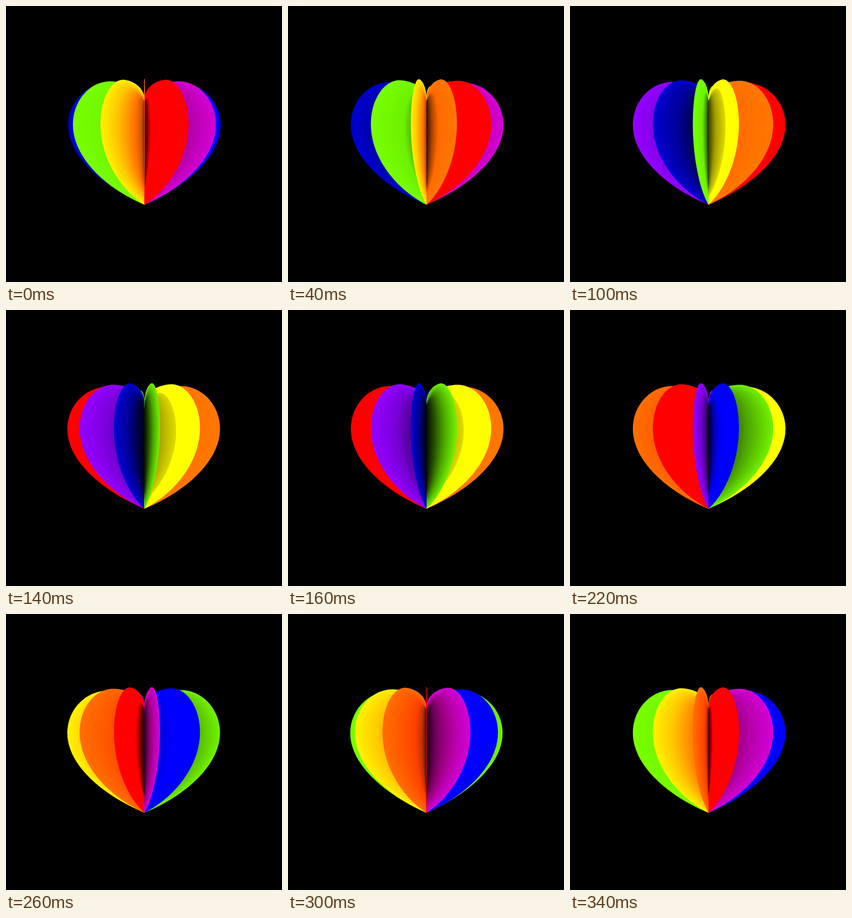
An HTML page with a canvas for the animation above (0.36 s loop, 500x500 px).

```html
<!DOCTYPE html>
<html lang="en">
<head>
<meta charset="utf-8">
<title>Turning paper heart</title>
<style>
  html, body { margin: 0; width: 100%; height: 100%; overflow: hidden; background: #000; }
  canvas { display: block; }
</style>
</head>
<body>
<canvas id="stage" width="500" height="500"></canvas>
<script>
const ctx = document.getElementById('stage').getContext('2d');
const AXIS = 250.75, EYE_Y = 230, RADIUS = 138, DEPTH = 0.155;
const STEP_MS = 20, STEPS = 18, TURN = 10, BANDS = 40;

// Half-heart outline as cubic curves: radius from the axis, height.
const curves = [
  [0, 170, 0, 152, 28, 140, 65, 140],
  [65, 140, 105, 140, RADIUS, 174, RADIUS, 216],
  [RADIUS, 216, RADIUS, 274, 73, 328, 0, 360]
];
const outline = curves.flatMap(c => Array.from({ length: 25 }, (_, i) => {
  const t = i / 24, u = 1 - t;
  const at = k => u * u * u * c[k] + 3 * u * u * t * c[k + 2] + 3 * u * t * t * c[k + 4] + t * t * t * c[k + 6];
  return [at(0), at(1)];
}));

// Shading of both faces, from the axis (0) to the rim (1).
const petals = [
  { left: [[0, '#300800'], [.12, '#c03000'], [.3, '#ff4000'], [.6, '#ff5500'], [1, '#ff6e00']],
    right: [[0, '#200c00'], [.2, '#a04000'], [.45, '#ff6a00'], [1, '#ff7800']] },
  { left: [[0, '#200000'], [.12, '#580000'], [.34, '#ff0000'], [1, '#ff0000']],
    right: [[0, '#300000'], [.1, '#900000'], [.18, '#ff0000'], [1, '#ff0000']] },
  { left: [[0, '#140028'], [.25, '#480088'], [.6, '#7800d8'], [1, '#9400ff']],
    right: [[0, '#180010'], [.25, '#70005c'], [.45, '#98007c'], [.7, '#b800ac'], [1, '#d400d4']] },
  { left: [[0, '#000018'], [.2, '#000038'], [.6, '#000098'], [1, '#0000d0']],
    right: [[0, '#000010'], [.2, '#0000a0'], [.35, '#0000e8'], [.6, '#0000ff'], [1, '#0000ff']] },
  { left: [[0, '#102400'], [.15, '#3c8000'], [.45, '#6cf000'], [1, '#78ff00']],
    right: [[0, '#040800'], [.3, '#244c00'], [.65, '#4ea800'], [1, '#70f000']] },
  { left: [[0, '#401000'], [.08, '#d05000'], [.25, '#ff7000'], [.45, '#ff9800'], [.7, '#ffc800'], [1, '#fff000']],
    right: [[0, '#383400'], [.27, '#a09c00'], [.6, '#dcd800'], [.61, '#ffff00'], [1, '#ffff00']] }
];

const rgb = hex => [1, 3, 5].map(i => parseInt(hex.slice(i, i + 2), 16));

function shade(stops, at) {
  const next = Math.max(1, stops.findIndex(([pos]) => pos >= at));
  const [p, from] = stops[next - 1], [q, to] = stops[next];
  const a = rgb(from), b = rgb(to);
  return `rgb(${a.map((v, i) => Math.round(v + (b[i] - v) * (at - p) / (q - p)))})`;
}

// Inner contours narrow towards the axis and shrink slightly in height.
function trace(angle, scale) {
  ctx.beginPath();
  for (const [r, y] of outline) {
    const radius = r * scale, height = 245 + (y - 245) * (0.7 + 0.3 * scale);
    const zoom = 1 / (1 - DEPTH * radius / RADIUS * Math.cos(angle));
    ctx.lineTo(AXIS + radius * Math.sin(angle) * zoom, EYE_Y + (height - EYE_Y) * zoom);
  }
}

function drawPetal({ left, right }, angle) {
  const side = Math.sin(angle);
  if (Math.abs(side) < 0.01) {
    trace(angle, 1);
    ctx.strokeStyle = shade(left, 1);
    ctx.stroke();
    return;
  }
  const stops = side < 0 ? left : right;
  for (let band = BANDS; band > 0; band--) {
    trace(angle, band / BANDS);
    ctx.fillStyle = shade(stops, band / BANDS);
    ctx.fill();
  }
}

function draw(step) {
  ctx.fillStyle = '#000';
  ctx.fillRect(0, 0, 500, 500);
  Array.from({ length: 12 }, (_, i) => ({
    petal: petals[i % 6],
    angle: (i * 30 + step * TURN) * Math.PI / 180
  }))
    .sort((a, b) => Math.cos(a.angle) - Math.cos(b.angle))
    .forEach(({ petal, angle }) => drawPetal(petal, angle));
}

const start = performance.now();
let shown = -1;
function tick() {
  const step = Math.floor((performance.now() - start) / STEP_MS + 0.001) % STEPS;
  if (step !== shown) draw(shown = step);
  requestAnimationFrame(tick);
}
tick();
</script>
</body>
</html>
```
